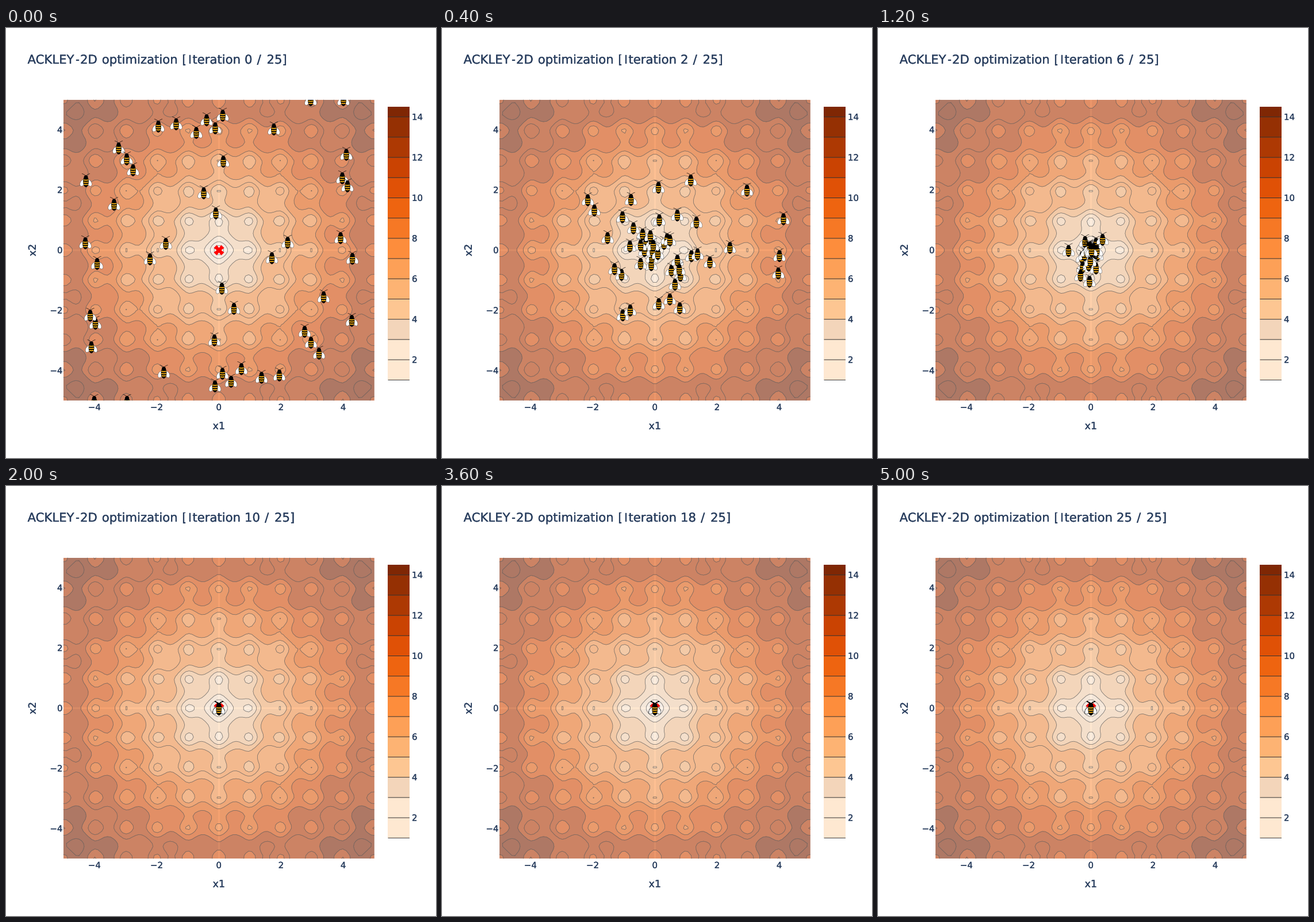
A matplotlib script for the animation above (5200 ms loop, 748 by 748 pixels).

```python
import numpy as np
import matplotlib.pyplot as plt
from matplotlib.animation import FuncAnimation
from matplotlib.collections import PathCollection
from matplotlib.patches import Rectangle
from matplotlib.path import Path
from matplotlib.patheffects import withStroke
from matplotlib.transforms import Affine2D, AffineDeltaTransform

SIZE, DPI = 748, 88
PT = 72 / DPI                      # points per pixel
K = SIZE / 600                     # layout units to pixels
STEPS = 26
X0, Y0, W, H = 80 * K, 100 * K, 434 * K, 420 * K
CENTRE = np.array([X0 + W / 2, Y0 + H / 2])
UNIT = np.array([W, -H]) / 10
INK = "#2a3f5f"

plt.rcParams["font.family"] = "DejaVu Sans"
plt.rcParams["text.hinting"] = "none"
fig = plt.figure(figsize=(SIZE / DPI, SIZE / DPI), dpi=DPI, facecolor="white")
ax = fig.add_axes([0, 0, 1, 1])
ax.set(xlim=(0, SIZE), ylim=(SIZE, 0))
ax.axis("off")


def label(x, y, text, size=12, **kw):
    kw.setdefault("va", "baseline")
    bold = withStroke(linewidth=0.3 * PT, foreground=INK)
    return ax.text(x, y, text, fontsize=size * K * PT, color=INK,
                   path_effects=[bold], **kw)


def px(v):
    return CENTRE[0] + UNIT[0] * v


def py(v):
    return CENTRE[1] + UNIT[1] * v


def ackley(x, y):
    r = np.sqrt((x**2 + y**2) / 2)
    waves = (np.cos(2 * np.pi * x) + np.cos(2 * np.pi * y)) / 2
    return 20 - 20 * np.exp(-0.2 * r) + np.e - np.exp(waves)


# Colours: one per band of the function value, seen at 60 % over a pale back
ORANGES = np.array([(255, 245, 235), (254, 230, 206), (253, 208, 162),
                    (253, 174, 107), (253, 141, 60), (241, 105, 19),
                    (217, 72, 1), (166, 54, 3), (127, 39, 4)]) / 255
BACK = np.array([229, 236, 246]) / 255
pos = np.linspace(0, 8, 15)
bar = np.stack([np.interp(pos, np.arange(9), c) for c in ORANGES.T], axis=1)
field = 0.6 * bar + 0.4 * BACK
for a in (6, 11, 13):
    field[a:a + 2] = field[a:a + 2].mean(axis=0)
bar[1:3] = bar[1:3].mean(axis=0)
bar[3] = field[4]

# Contour field, lighter along the zero lines
grid = np.linspace(-5, 5, 100)
gx, gy = np.meshgrid(grid, grid)
surface = px(gx), py(gy), ackley(gx, gy)
levels = np.arange(1, 15)


def fill(colors, x, y, w, h):
    bands = ax.contourf(*surface, levels=[-1, *levels, 20], colors=colors,
                        antialiased=True, zorder=1)
    bands.set_clip_path(Rectangle((x, y), w, h, transform=ax.transData))


lit = np.clip(field + 0.4 * (1 - BACK), 0, 1)
fill(field, X0, Y0, W, H)
fill(lit, CENTRE[0] - K, Y0, 2 * K, H)
fill(lit, X0, CENTRE[1] - K, W, 2 * K)
ax.contour(*surface, levels=levels, colors="#444444", alpha=0.75,
           linewidths=0.75 * PT, zorder=3)

# Axes text
for v in range(-4, 5, 2):
    text = str(v).replace("-", "\u2212")
    label(px(v), 664.8, text, ha="center")
    label(98.5, py(v) + 5.3, text, ha="right")
label(CENTRE[0], 698, "x1", 14, ha="center")
label(47, CENTRE[1], "x2", 14, ha="center", va="center", rotation=90)


# Colour bar
def bar_y(v):
    return 612.3 - 35.2 * (v - 1)


for v in levels:
    top = bar_y(min(v + 1, 14.5))
    ax.add_patch(Rectangle((664.5, top), 37.5, bar_y(v) - top, fc=bar[v], lw=0))
for v in levels:
    ax.plot([664.5, 702], [bar_y(v)] * 2, color="#333333", lw=PT, snap=False,
            solid_capstyle="butt", zorder=3)
    if v % 2 == 0:
        label(706, bar_y(v) + 5.3, str(v))

# Title, in pieces so that the counter can grow
for x, piece in ((37.5, "ACKLEY"), (120.5, "-"), (129, "2D"),
                 (166.8, "optimization"), (306, "["), (316.6, "I"),
                 (324.4, "teration")):
    label(x, 62, piece, 17)
count = label(415, 62, "", 17)
slash = label(436.6, 62, "/", 17)
total = label(453.5, 62, "25]", 17)
TAIL = [(t, t.get_position()[0]) for t in (slash, total)]

ax.plot(*CENTRE, marker="X", ms=17.6 * PT, mfc="red", mec="none", zorder=4)


# Bee: parts drawn back to front around its centre
def oval(x, y, rx, ry, tilt=0):
    t = Affine2D().scale(rx, ry).rotate_deg(tilt).translate(x, y)
    return Path.unit_circle().transformed(t)


def stripe(y, half):
    return Path([(-half, y - 0.9), (0, y - 0.5), (half, y - 0.9), (half, y + 0.9),
                 (0, y + 1.3), (-half, y + 0.9), (-half, y - 0.9)])


def feeler(side):
    return Path([(0, -7.5), (side * 2.5, -10.5), (side * 7, -11.6)],
                [Path.MOVETO, Path.CURVE3, Path.CURVE3])


GOLD = "#fdb515"
PARTS = [(feeler(-1), "none", "black", 0.6), (feeler(1), "none", "black", 0.6),
         (oval(-6, 4.5, 3.7, 6.2, 28), "white", "#444444", 0.45),
         (oval(6, 4.5, 3.7, 6.2, -28), "white", "#444444", 0.45),
         (oval(0, -5.4, 3.4, 3.4), "black", "none", 0),
         (oval(0, 2.2, 4.9, 9.6), "black", "none", 0),
         (stripe(-0.6, 4.2), GOLD, "none", 0),
         (stripe(3.2, 4.4), GOLD, "none", 0),
         (stripe(7, 3.5), GOLD, "none", 0)]
paths, faces, edges, widths = zip(*PARTS)
swarm = PathCollection(paths, facecolors=faces, edgecolors=edges,
                       linewidths=[w * PT for w in widths],
                       offsets=np.zeros((1, 2)), offset_transform=ax.transData,
                       transform=AffineDeltaTransform(ax.transData), zorder=5)
ax.add_collection(swarm, autolim=False)
swarm.set_clip_path(Rectangle((X0, Y0), W, H, transform=ax.transData))

# Start: half of the bees, the others mirrored through the centre
half = np.array([
    (265, 170), (296, 166), (349, 159), (377, 151), (364, 173), (331, 181),
    (466, 175), (196, 208), (210, 227), (221, 246), (378, 231), (139, 265),
    (344, 286), (188, 306), (365, 321), (592, 219), (585, 260), (594, 274),
    (582, 364), (138, 373), (278, 374), (490, 372), (530, 124), (587, 124)])
half = (half - CENTRE) / UNIT


def search(bees, steps, seed=4):
    """Each step a bee tries a move on one axis and keeps it if it is better."""
    rng = np.random.default_rng(seed)
    rows = np.arange(len(bees))
    path = [bees]
    for k in range(1, steps):
        reach = np.abs(bees)
        axis = (rng.random(len(bees)) * reach.sum(axis=1) > reach[:, 0]).astype(int)
        trial = bees.copy()
        trial[rows, axis] *= rng.uniform(-0.8, 0.8, len(bees))
        better = ackley(*trial.T) < ackley(*bees.T)
        bees = np.where(better[:, None], trial, bees)
        if k > 6:                  # the swarm closes in
            bees = bees * 0.35
        path.append(bees)
    return path


history = search(np.vstack([half, -half]), STEPS)


def update(k):
    spots = CENTRE + UNIT * history[k]
    swarm.set_offsets(np.repeat(spots, len(PARTS), axis=0))
    count.set_text(str(k))
    for text, x in TAIL:
        text.set_x(x + (13.5 if k > 9 else 0))
    return swarm, count, slash, total


anim = FuncAnimation(fig, update, frames=STEPS, interval=200, repeat=True,
                     repeat_delay=0, blit=False)
plt.show()
```
